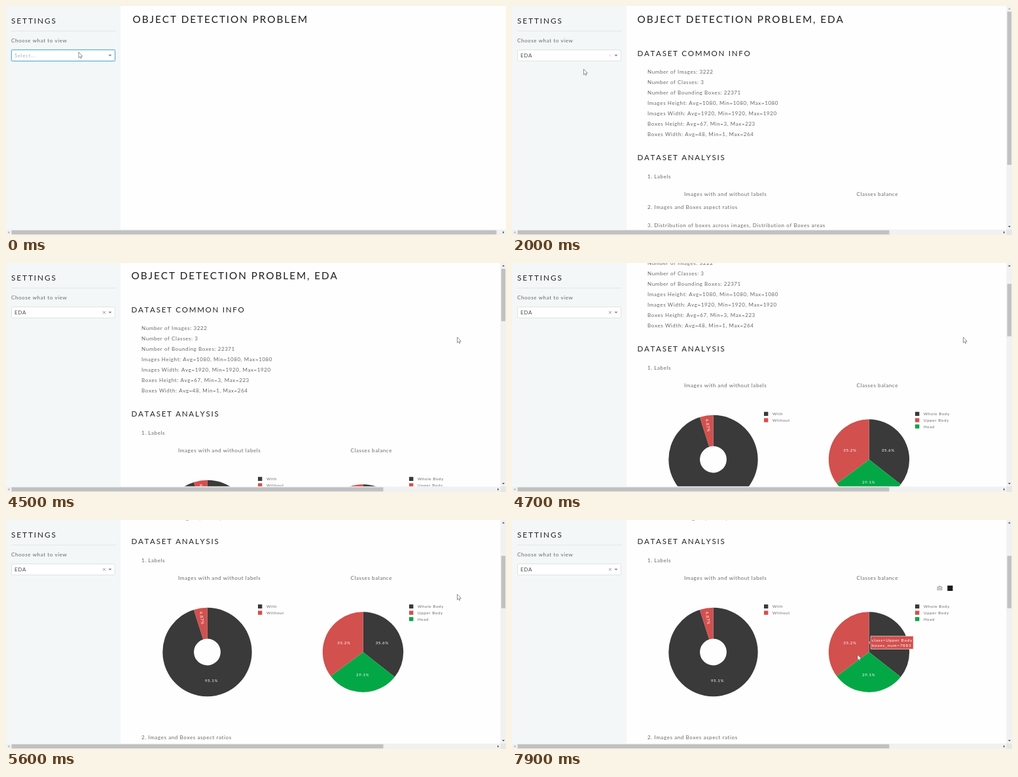
An HTML page with a canvas for the animation above (8000 ms loop, 764x352 px).

```html
<!DOCTYPE html>
<html lang="en">
<head>
<meta charset="utf-8">
<title>Object detection dashboard</title>
<style>
  html, body { margin: 0; width: 100%; height: 100%; overflow: hidden; background: #fefefe; }
  canvas { display: block; }
</style>
</head>
<body>
<canvas id="stage" width="764" height="352"></canvas>
<script>
const ctx = document.getElementById('stage').getContext('2d');
const LOOP = 8000, STEP = 100;
const W = 764, H = 352, SIDE = 175, BAR = 343.6;
const DARK = '#3a3a3a', RED = '#d2504e', GREEN = '#04a746';

// Text styles: size, letter spacing, colour
const STYLE = {
  title:  [15.3, 1.93, '#1d1d1d'],
  head:   [11.6, 1.7, '#222'],
  side:   [11.8, 1.92, '#222'],
  body:   [8, 0.59, '#686868'],
  value:  [8, 0.6, '#484848'],
  hint:   [8, 0.65, '#b2b2b2'],
  legend: [6.2, 0.6, '#686868'],
  slice:  [6.2, 0.6, '#fff'],
  tip:    [6.5, 0.65, '#fff']
};

const INFO = [
  'Number of Images: 3222',
  'Number of Classes: 3',
  'Number of Bounding Boxes: 22371',
  'Images Height: Avg=1080, Min=1080, Max=1080',
  'Images Width: Avg=1920, Min=1920, Max=1920',
  'Boxes Height: Avg=67, Min=3, Max=223',
  'Boxes Width: Avg=48, Min=1, Max=264'
];

const PIE = { x: 545.5, y: 403, r: 61.7 };
const CLASSES = [
  { name: 'Whole Body', count: 7973, label: '35.6%', color: DARK },
  { name: 'Head', count: 6515, label: '29.1%', color: GREEN, left: true },
  { name: 'Upper Body', count: 7883, label: '35.2%', color: RED }
];
const total = CLASSES.reduce((sum, c) => sum + c.count, 0);
let start = 0;
for (const c of CLASSES) {
  c.from = start;
  c.to = start += c.count / total;
  const mid = (c.from + c.to) * Math.PI;
  const half = Math.sin(Math.PI * (c.to - c.from));
  c.inner = PIE.r * half / (1 + half);
  c.x = PIE.x + (PIE.r - c.inner) * Math.sin(mid);
  c.y = PIE.y - (PIE.r - c.inner) * Math.cos(mid);
}

const SCROLL = [[4400, 0], [4500, 1], [4600, 42], [4700, 101], [4800, 145],
  [4900, 172], [5000, 187], [5100, 195], [5200, 199], [5300, 200]];
const POINTER = [[600, 111, 71], [900, 109.5, 97], [2600, 109.5, 97],
  [3500, 689.5, 114], [5800, 689.5, 114], [6400, 588, 207], [6700, 588, 207],
  [7000, 583.5, 230], [7300, 562, 242], [7600, 545, 246], [7700, 542, 243],
  [7900, 528, 207]];

const linear = p => p;
const smooth = p => p * p * (3 - 2 * p);

function sample(keys, t, ease) {
  if (t <= keys[0][0]) return keys[0].slice(1);
  for (let i = 1; i < keys.length; i++) {
    const a = keys[i - 1], b = keys[i];
    if (t <= b[0]) {
      const p = ease((t - a[0]) / (b[0] - a[0]));
      return a.slice(1).map((v, k) => v + (b[k + 1] - v) * p);
    }
  }
  return keys[keys.length - 1].slice(1);
}

function rect(x, y, w, h, color) {
  ctx.fillStyle = color;
  ctx.fillRect(x, y, w, h);
}

function rounded(x, y, w, h, r, fill, line) {
  ctx.beginPath();
  ctx.roundRect(x, y, w, h, r);
  ctx.fillStyle = fill;
  ctx.fill();
  if (line) {
    ctx.strokeStyle = line;
    ctx.lineWidth = 1;
    ctx.stroke();
  }
}

function poly(points, color) {
  ctx.beginPath();
  points.forEach(([x, y]) => ctx.lineTo(x, y));
  ctx.closePath();
  ctx.fillStyle = color;
  ctx.fill();
}

function setFont(style) {
  const [size, gap, color] = STYLE[style];
  ctx.font = `${size}px Lato, "Open Sans", sans-serif`;
  ctx.letterSpacing = gap + 'px';
  ctx.fontKerning = 'none';
  ctx.fillStyle = color;
  return size;
}

// y is the middle of the capital letters
function text(str, x, y, style, align = 'left') {
  const size = setFont(style);
  ctx.textAlign = align;
  ctx.fillText(str, x, y + size * 0.36);
}

function slice(x, y, r, from, to, color, hole = 0) {
  const a = (from - 0.25) * 2 * Math.PI, b = (to - 0.25) * 2 * Math.PI;
  ctx.beginPath();
  ctx.arc(x, y, r, a, b);
  if (hole) ctx.arc(x, y, hole, b, a, true);
  else ctx.lineTo(x, y);
  ctx.closePath();
  ctx.fillStyle = color;
  ctx.fill();
}

function legend(x, y, entries) {
  entries.forEach(([name, color], i) => {
    rect(x, y - 3.2 + i * 9.7, 6.4, 6.2, color);
    text(name, x + 13, y + i * 9.7, 'legend');
  });
}

function tooltip(c) {
  const dir = c.left ? -1 : 1;
  const tip = c.x + dir * c.inner;
  const lines = ['class=' + c.name, 'boxes_num=' + c.count];
  setFont('tip');
  const w = Math.max(...lines.map(s => ctx.measureText(s).width)) + 3;
  const near = tip + dir * 2.7, far = near + dir * w, y = c.y;
  ctx.beginPath();
  [[tip, y], [near, y - 3], [near, y - 10], [far, y - 10],
   [far, y + 10], [near, y + 10], [near, y + 3]].forEach(p => ctx.lineTo(...p));
  ctx.closePath();
  ctx.fillStyle = c.color;
  ctx.fill();
  ctx.strokeStyle = '#fff';
  ctx.lineWidth = 0.6;
  ctx.stroke();
  lines.forEach((s, i) => text(s, near + dir * 1.8, y - 4.2 + i * 8.6, 'tip', c.left ? 'right' : 'left'));
}

function tools() {
  rounded(649.5, 302.2, 8, 6, 1, '#b4b4b4');
  rect(651.8, 301, 3.4, 2, '#b4b4b4');
  ctx.beginPath();
  ctx.arc(653.5, 305.2, 1.9, 0, 7);
  ctx.strokeStyle = '#fff';
  ctx.lineWidth = 0.8;
  ctx.stroke();
  rect(665.3, 300.8, 8.2, 8.2, '#1c1c1c');
}

function charts(px, py) {
  const x = 307.5, y = 403, cut = 0.9513;
  slice(x, y, 68.2, 0, cut, DARK, 20.4);
  slice(x, y, 68.2, cut, 1, RED, 20.4);
  text('95.1%', 314, 447, 'slice', 'center');
  ctx.save();
  ctx.translate(299.2, 350.7);
  ctx.rotate((90 - 8.8) * Math.PI / 180);
  text('4.87%', 0, 0, 'slice', 'center');
  ctx.restore();
  legend(385, 333, [['With', DARK], ['Without', RED]]);

  for (const c of CLASSES) slice(PIE.x, PIE.y, PIE.r, c.from, c.to, c.color);
  for (const c of CLASSES) text(c.label, c.x, c.y, 'slice', 'center');
  legend(616, 333, [CLASSES[0], CLASSES[2], CLASSES[1]].map(c => [c.name, c.color]));

  if (px > 450 && px < 676 && py > 298 && py < 510) tools();
  const dx = px - PIE.x, dy = py - PIE.y;
  if (Math.hypot(dx, dy) < PIE.r) {
    const turn = (Math.atan2(dx, -dy) / (2 * Math.PI) + 1) % 1;
    tooltip(CLASSES.find(c => turn < c.to));
  }
}

function page(scroll, loaded, px, py) {
  ctx.save();
  ctx.beginPath();
  ctx.rect(SIDE, 0, 756 - SIDE, BAR);
  ctx.clip();
  ctx.translate(0, -scroll);
  text('OBJECT DETECTION PROBLEM, EDA', 191.6, 20.8, 'title');
  text('DATASET COMMON INFO', 191.5, 72.4, 'head');
  INFO.forEach((s, i) => text(s, 207, 101.3 + i * 15.9, 'body'));
  text('DATASET ANALYSIS', 191.5, 233, 'head');
  text('1. Labels', 207, 262, 'body');
  text('Images with and without labels', 263, 289.5, 'body');
  text('Classes balance', 526.5, 289.5, 'body');
  text('2. Images and Boxes aspect ratios', 207, loaded ? 534.5 : 309.5, 'body');
  if (loaded) charts(px, py + scroll);
  else text('3. Distribution of boxes across images, Distribution of Boxes areas', 207, 337, 'body');
  ctx.restore();
}

function sidebar(t) {
  const chosen = t >= 1400, open = t >= 100 && !chosen, focus = t < 2000;
  rect(0, 0, SIDE, BAR, '#f3f7f7');
  text('SETTINGS', 8, 22.8, 'side');
  rect(8, 38, 160, 1, '#e2e7e7');
  text('Choose what to view', 8, 52.7, 'body');

  if (focus) rounded(7, 66, 161, 20, 2.5, '#cfe6f3');
  rounded(8.5, 67.5, 158, 17, 2, '#fff', focus ? '#62aeda' : '#dfe2e2');
  if (chosen) text('EDA', 13, 76, 'value');
  else text('Select...', 13, 76, 'hint');
  if (chosen) {
    ctx.beginPath();
    for (const d of [-1, 1]) {
      ctx.moveTo(147.9, 76 - 2.1 * d);
      ctx.lineTo(152.1, 76 + 2.1 * d);
    }
    ctx.strokeStyle = t < 2100 ? '#e4e4e4' : '#9a9a9a';
    ctx.lineWidth = 0.9;
    ctx.stroke();
  }
  const d = open ? -1 : 1;
  poly([[156.4, 76 - 1.3 * d], [161.6, 76 - 1.3 * d], [159, 76 + 1.4 * d]], '#8c8c8c');

  if (open) {
    rounded(8.5, 85, 158, 35, 1, '#fff', '#d5d8d8');
    rect(9, 85.5, 157, 17.5, '#e8f3fd');
    text('EDA', 13, 94.5, 'value');
  }
}

function scrollbars(wide, scroll, loaded) {
  const track = '#f1f1f1', thumb = '#c1c1c1', on = '#505050', off = '#a8a8a8';
  const right = wide ? 752 : 760;
  rect(0, BAR, W, H - BAR, track);
  rect(8.5, 344.7, wide ? 568 : 741, 6.4, thumb);
  poly([[5.2, 346], [5.2, 350], [3, 348]], off);
  poly([[right - 1, 346], [right - 1, 350], [right + 1.2, 348]], on);
  if (!wide) return;
  rect(755.6, 0, 8.4, BAR, track);
  rect(755.6, BAR, 8.4, 8.4, '#e6e6e6');
  rect(756.7, 8.7 + scroll * 0.232, 6.4, loaded ? 80.5 : 235.5, thumb);
  poly([[758, 5.2], [762, 5.2], [760, 3]], scroll > 0 ? on : off);
  poly([[758, 338], [762, 338], [760, 340.2]], on);
}

function pointer(x, y) {
  ctx.beginPath();
  [[0, 0], [0, 8.6], [1.9, 6.9], [3.2, 9.6], [4.5, 9], [3.3, 6.4], [5.8, 6.2]]
    .forEach(([a, b]) => ctx.lineTo(x + a, y + b));
  ctx.closePath();
  ctx.fillStyle = '#fff';
  ctx.fill();
  ctx.strokeStyle = '#555';
  ctx.lineWidth = 0.65;
  ctx.stroke();
}

function draw(t) {
  const [scroll] = sample(SCROLL, t, linear);
  const [px, py] = sample(POINTER, t, smooth);
  const shown = t >= 2000, loaded = t >= 2800;
  rect(0, 0, W, H, '#fefefe');
  if (shown) page(scroll, loaded, px, py);
  else text('OBJECT DETECTION PROBLEM', 193.6, 20.8, 'title');
  sidebar(t);
  scrollbars(shown, scroll, loaded);
  pointer(px, py);
}

const origin = performance.now();
function tick() {
  const t = (performance.now() - origin) % LOOP;
  draw(Math.floor(t / STEP) * STEP);
  requestAnimationFrame(tick);
}
tick();
</script>
</body>
</html>
```
